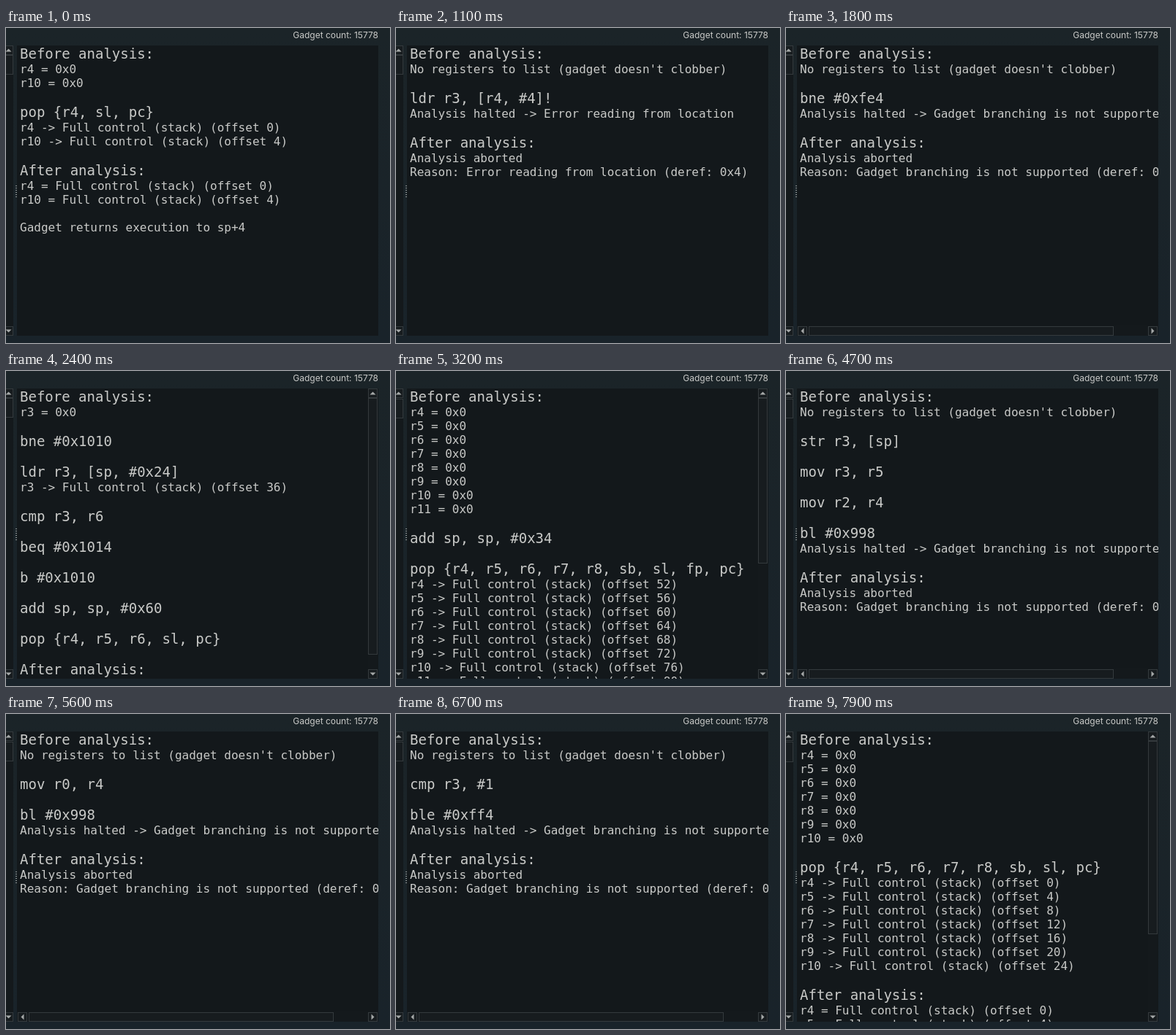
These frames come from a looping animation (525x432 px, 8 s). An HTML page:

```html
<!DOCTYPE html>
<html lang="en">
<head>
<meta charset="utf-8">
<title>Gadget analysis</title>
<style>
  html, body { margin: 0; width: 100%; height: 100%; overflow: hidden; background: #1a2328; }
  svg { display: block; }
  text { white-space: pre; fill: #c9cac8; font: 16px "DejaVu Sans Mono", monospace; }
  .head { font-size: 19px; }
  .count { font: 12px Inter, sans-serif; text-anchor: end; }
  .track { fill: #14191c; }
  .part { fill: #171c1f; stroke: #343a3d; }
  .arrow { fill: #a5a8a8; }
</style>
</head>
<body>
<svg width="525" height="432" viewBox="0 0 525 432">
  <defs>
    <linearGradient id="shade" x1="0" y1="0" x2="0" y2="1">
      <stop offset="0" stop-color="#1b2428"/>
      <stop offset="1" stop-color="#19232a"/>
    </linearGradient>
    <clipPath id="view"><rect x="15" y="24" width="494" height="398"/></clipPath>
  </defs>
  <rect width="525" height="432" fill="url(#shade)"/>
  <rect y="24" width="10" height="398" fill="#171c1f"/>
  <rect x="15" y="24" width="494" height="398" fill="#13181b"/>
  <path d="M14 216v18" stroke="#8d9293" stroke-width="2" stroke-dasharray="1 2"/>
  <text class="count" x="509" y="14">Gadget count: 15778</text>
  <g id="side"></g>
  <g id="panel" clip-path="url(#view)"></g>
</svg>
<script>
const LOOP = 8000;
const CHAR = 9.632;
const ALIAS = { sb: "r9", sl: "r10", fp: "r11" };
const NONE = "No registers to list (gadget doesn't clobber)";
const BRANCH = "Gadget branching is not supported";
const READ = "Error reading from location";

const stack = offset => `Full control (stack) (offset ${offset})`;
const op = (head, effects = {}) => ({ head, effects });

function pop(names, from = 0) {
  const list = names.split(" ");
  const effects = {};
  list.slice(0, -1).forEach((r, i) => effects[ALIAS[r] || r] = stack(from + 4 * i));
  return op(`pop {${list.join(", ")}}`, effects);
}

const toOps = steps => steps.map(s => typeof s === "string" ? op(s) : s);
const show = (values, sign) => Object.entries(values).map(([r, v]) => `${r} ${sign} ${v}`);
const listed = lines => lines.length ? lines : [NONE];

// A gadget that runs to its end.
function run(steps, target) {
  const ops = toOps(steps);
  const final = Object.assign({}, ...ops.map(o => o.effects));
  const sections = [
    { head: "Before analysis:", lines: listed(Object.keys(final).map(r => `${r} = 0x0`)) },
    ...ops.map(o => ({ head: o.head, lines: show(o.effects, "->") })),
    { head: "After analysis:", lines: listed(show(final, "=")) }
  ];
  if (target) sections.push({ lines: [`Gadget returns execution to ${target}`] });
  return sections;
}

// A gadget whose last step stops the analysis.
function halt(steps, reason, address) {
  const sections = steps.map(head => ({ head, lines: [] }));
  sections[sections.length - 1].lines = [`Analysis halted -> ${reason}`];
  return [
    { head: "Before analysis:", lines: [NONE] },
    ...sections,
    { head: "After analysis:", lines: ["Analysis aborted", `Reason: ${reason} (deref: ${address})`] }
  ];
}

const load = ["cmp r3, r6", "ldr r3, [r4, #4]!"];
const call = ["mov r2, sb", "mov r1, r8", "mov r0, r7", "blx r3"];
const skip = ["cmp r4, r6", "bne #0xfe4"];
const long = ["bne #0x1010", op("ldr r3, [sp, #0x24]", { r3: stack(36) }), "cmp r3, r6",
  "beq #0x1014", "b #0x1010", "add sp, sp, #0x60", "pop {r4, r5, r6, sl, pc}"];
const wide = [
  op("add r4, sp, #0x30", { r4: 8496 }),
  op("ldmda r4, {r0, r1}", { r0: stack(44), r1: stack(48) }),
  "add sp, sp, #0x34",
  pop("r4 r5 r6 r7 r8 sb sl fp pc", 52)
];
const store = ["str r3, [sp]", "mov r3, r5", "mov r2, r4", "bl #0x998"];
const less = ["str r3, [r4]", "cmp r3, #1", "ble #0xff4"];
const pair = pop("r4 sl pc");
const many = pop("r4 r5 r6 r7 r8 sb sl pc");

// [start in ms, sections, bottom of the vertical thumb if fixed]
const scenes = [
  [0, run([pair], "sp+4")],
  [100, run(["cmp r3, #0", pair], "sp+4")],
  [500, run(["bne #0x1010", "cmp r3, #0", pair], "sp+4")],
  [1100, halt(load.slice(1), READ, "0x4")],
  [1200, halt(load, READ, "0x4")],
  [1300, halt(call.slice(3), BRANCH, "0x0")],
  [1400, halt(call.slice(2), BRANCH, "0x0")],
  [1500, halt(call.slice(1), BRANCH, "0x0")],
  [1600, halt(call, BRANCH, "0x0")],
  [1700, halt(["add r5, r5, #1", ...load.slice(1)], READ, "0x4")],
  [1800, halt(skip.slice(1), BRANCH, "0xfe4")],
  [1900, halt(skip, BRANCH, "0xfe4")],
  [2000, run(long.slice(4))],
  [2100, run(long.slice(3))],
  [2200, run(long.slice(2))],
  [2300, run(long.slice(1))],
  [2400, run(long), 388],
  [2900, halt(["bl #0x998"], BRANCH, "0x998")],
  [3000, halt(["mov r0, r4", "bl #0x998"], BRANCH, "0x998")],
  [3100, run([pop("r4 r5 r6 r7 r8 sb sl fp pc")], "sp+28")],
  [3200, run(wide.slice(2), "sp+80")],
  [3300, halt(["ldmda r4, {r0, r1}"], READ, "0x0")],
  [4000, run(wide, "sp+80"), 206],
  [4100, halt(["blx r3"], BRANCH, "0x0")],
  [4200, halt(["mov r0, r4", "blx r3"], BRANCH, "0x0")],
  [4300, halt(["mov r1, r5", "mov r0, r4", "blx r3"], BRANCH, "0x0")],
  [4400, halt(store.slice(3), BRANCH, "0x998")],
  [4500, halt(store.slice(2), BRANCH, "0x998")],
  [4600, halt(store.slice(1), BRANCH, "0x998")],
  [4700, halt(store, BRANCH, "0x998")],
  [5000, run([pop("r4 r5 r6 pc")], "sp+8")],
  [5300, run(["add sp, sp, #8", pop("r4 r5 r6 r7 r8 pc", 8)], "sp+24")],
  [5500, halt(["bl #0x998"], BRANCH, "0x998")],
  [5600, halt(["mov r0, r4", "bl #0x998"], BRANCH, "0x998")],
  [5900, run(["bx lr"], "lr")],
  [6200, run(["str r3, [r2]", "bx lr"], "lr")],
  [6700, halt(less.slice(1), BRANCH, "0xff4")],
  [7100, halt(less, BRANCH, "0xff4")],
  [7200, halt(["mov r0, r4", "bl #0x998"], BRANCH, "0x998")],
  [7300, run([pop("r4 r5 r6 pc")], "sp+8")],
  [7800, run(["add sp, sp, #8", pop("r4 r5 r6 pc", 8)], "sp+16")],
  [7900, run([many], "sp+24"), 301]
];

const escapeText = s => s.replace(/&/g, "&amp;").replace(/</g, "&lt;").replace(/>/g, "&gt;");
const label = (s, y, cls) => `<text class="${cls}" x="19" y="${y}">${escapeText(s)}</text>`;
const box = (x, y, w, h) => `<rect class="part" x="${x + .5}" y="${y + .5}" width="${w}" height="${h}"/>`;
const arrow = (x, y, turn) =>
  `<path class="arrow" d="M-4 2L0 -2L4 2Z" transform="translate(${x} ${y}) rotate(${turn})"/>`;

function verticalBar(x, top, bottom) {
  return `<rect class="track" x="${x}" y="24" width="13" height="398"/>` +
    box(x, 24, 12, 12) + arrow(x + 6.5, 30.5, 0) +
    box(x, 409, 12, 12) + arrow(x + 6.5, 415.5, 180) +
    box(x, top, 12, bottom - top);
}

function horizontalBar() {
  return `<rect class="track" x="15" y="408" width="494" height="14"/>` +
    box(16, 409, 12, 12) + arrow(22.5, 415.5, -90) +
    box(495, 409, 12, 12) + arrow(501.5, 415.5, 90) +
    box(31, 409, 416, 12);
}

function draw([, sections, thumb]) {
  let html = "", y = 35, widest = 0, last = "";
  for (const { head, lines } of sections) {
    if (last) y += last === "head" ? 42 : head ? 40 : 38;
    if (head) {
      html += label(head, y + 7, "head");
      last = "head";
    }
    lines.forEach((line, i) => {
      if (i || head) y += last === "head" ? 21 : 19;
      html += label(line, y + 6, "line");
      widest = Math.max(widest, line.length * CHAR);
      last = "line";
    });
  }
  if (y > 408) html += verticalBar(495, 37, thumb || Math.round(37 + 371 * 398 / (y - 4)));
  if (widest > 486) html += horizontalBar();
  return html;
}

const panel = document.getElementById("panel");
const side = document.getElementById("side");
const pictures = scenes.map(draw);
let shown = -1;

function tick(now) {
  const t = now % LOOP;
  const index = scenes.findLastIndex(([start]) => start <= t);
  if (index !== shown) {
    shown = index;
    panel.innerHTML = pictures[index];
    const shift = (t >= 3100) + (t >= 7800);
    side.innerHTML = verticalBar(-3, 37 + (shift > 0), 63 + shift);
  }
  requestAnimationFrame(tick);
}
tick(0);
</script>
</body>
</html>
```
